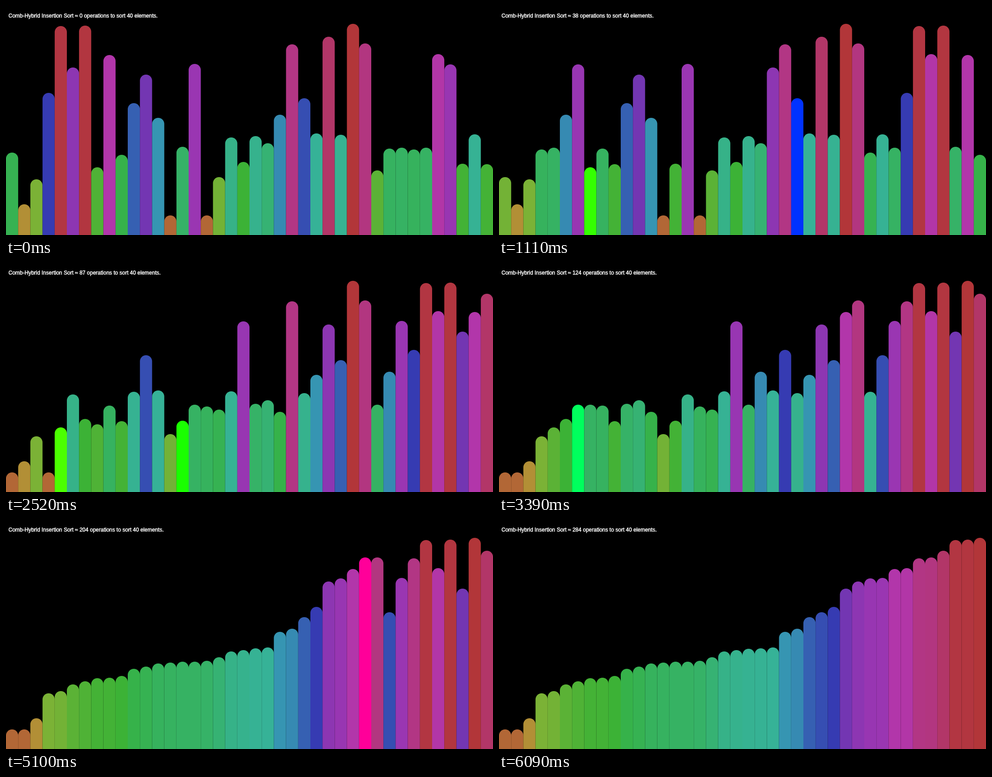
Recreate the animation shown at these times as an HTML page with a canvas. Size 1088 px wide and 514 px high, loop 9000 ms.

```html
<!DOCTYPE html>
<html lang="en">
<head>
<meta charset="utf-8">
<title>Comb-Hybrid Insertion Sort</title>
<style>
  html, body { margin: 0; width: 100%; height: 100%; overflow: hidden; background: #000; }
  canvas { display: block; }
</style>
</head>
<body>
<canvas width="1088" height="514"></canvas>
<script>
const canvas = document.querySelector('canvas');
const ctx = canvas.getContext('2d');
const { width, height } = canvas;
const STEP = 30, LOOP = 9000;

// Top edge of each bar before sorting.
const tops = [
  329, 445, 389, 195, 45, 138, 44, 362, 110, 334,
  218, 154, 251, 470, 316, 130, 470, 384, 295, 350,
  292, 308, 244, 86, 207, 286, 69, 289, 40, 84,
  369, 320, 318, 322, 318, 108, 131, 354, 288, 355];
const count = tops.length;
const barWidth = width / count;
const maxLength = height * 0.9;

// Runs the sort and records one snapshot per visible step.
function recordSort(initial) {
  const a = initial.map(top => (height - barWidth / 2 - top) / maxLength);
  const steps = [];
  let ops = 0;
  const snap = (...active) => steps.push({ values: [...a], ops, active });

  snap();
  let gap = count;
  const shrink = () => { ops++; gap = Math.floor(gap / 1.3); };
  shrink();
  snap();
  snap();
  while (gap >= 10) {
    for (let i = 0; i + gap < count; i++) {
      ops++;
      if (a[i] > a[i + gap]) [a[i], a[i + gap]] = [a[i + gap], a[i]];
      snap(i, i + gap);
    }
    shrink();
  }

  for (let i = 1; i < count; i++) {
    const key = a[i];
    let j = i - 1;
    ops++;
    for (; j >= 0 && a[j] > key; j--) {
      ops++;
      a[j + 1] = a[j];
      snap(j);
    }
    a[j + 1] = key;
  }

  ops += count - 1; // closing order check
  snap();
  return steps;
}

function draw({ values, ops, active }) {
  ctx.fillStyle = '#000';
  ctx.fillRect(0, 0, width, height);

  ctx.lineWidth = barWidth;
  ctx.lineCap = 'round';
  values.forEach((value, i) => {
    const x = (i + 0.5) * barWidth;
    const tone = active.includes(i) ? '100%, 50%' : '53.5%, 45.5%';
    ctx.strokeStyle = `hsl(${value * 360}, ${tone})`;
    ctx.beginPath();
    ctx.moveTo(x, height);
    ctx.lineTo(x, height - value * maxLength);
    ctx.stroke();
  });

  const label = `Comb-Hybrid Insertion Sort ≈ ${ops} operations to sort ${count} elements.`;
  ctx.font = '12px "Liberation Sans", Arial, sans-serif';
  ctx.fillStyle = ctx.strokeStyle = '#fff';
  ctx.lineWidth = 0.5;
  ctx.fillText(label, 5.5, 26);
  ctx.strokeText(label, 5.5, 26);
}

const steps = recordSort(tops);

function tick() {
  const index = Math.floor((performance.now() % LOOP) / STEP);
  draw(steps[Math.min(index, steps.length - 1)]);
  requestAnimationFrame(tick);
}
tick();
</script>
</body>
</html>
```
